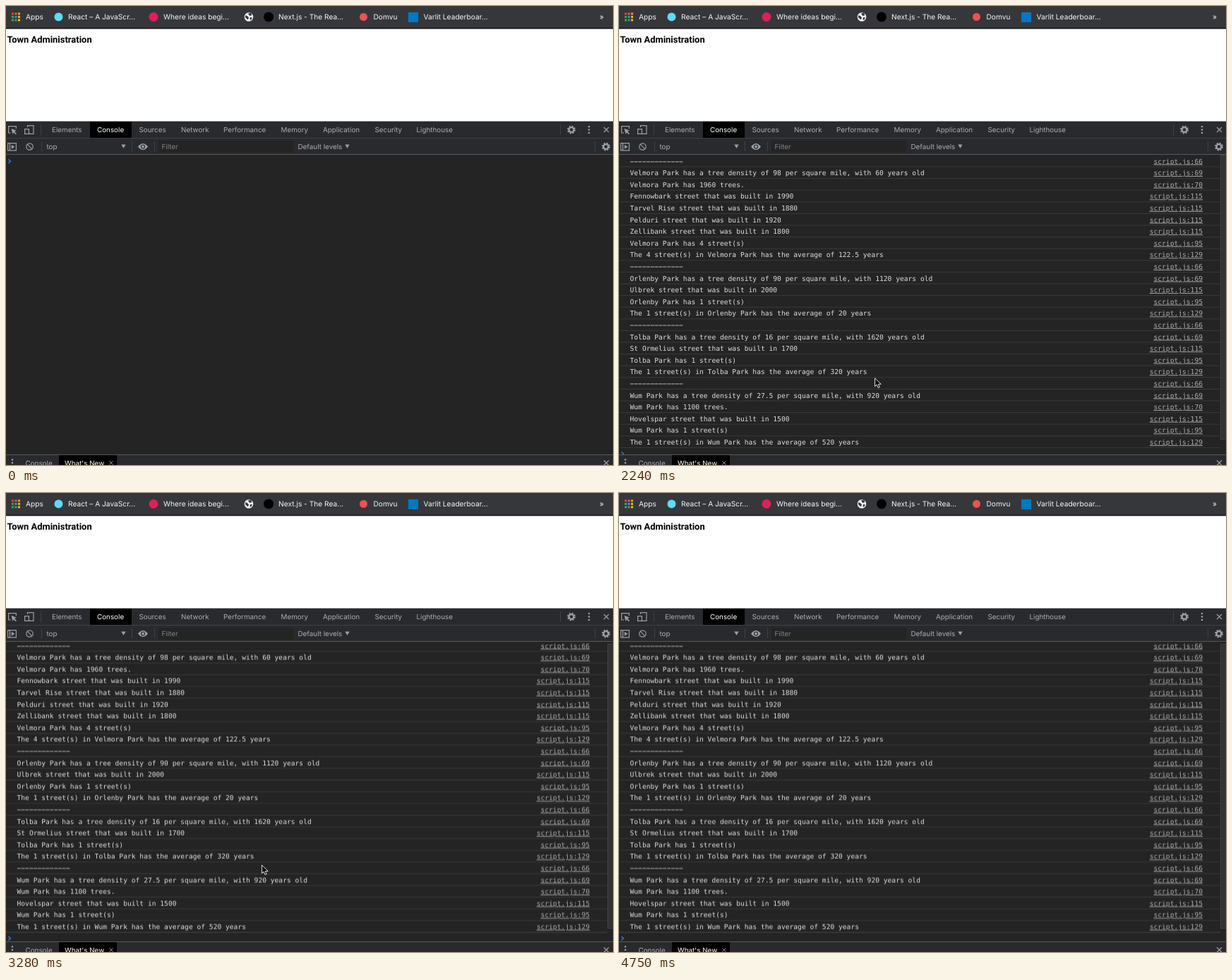
Animation of 860 by 651 pixels, one loop 6520 ms. Source, as an HTML page:

```html
<!DOCTYPE html>
<html lang="en">
<head>
<meta charset="utf-8">
<title>Town Administration</title>
<style>
  html, body { margin: 0; width: 100%; height: 100%; overflow: hidden; background: #fff; }
  svg { display: block; }
  text { font: 9.85px Inter, sans-serif; fill: #a9aeb4; text-rendering: geometricPrecision; white-space: pre; }
  .bm { font-size: 10.2px; fill: #f4f5f6; }
  .on { fill: #fff; }
  .dim { fill: #80858a; }
  .mono { font: 9.64px "DejaVu Sans Mono", monospace; fill: #dedede; }
  .link { fill: #acacac; text-decoration: underline; }
  .title { font: 700 12.95px Roboto, sans-serif; fill: #000; }
  .icon { fill: none; stroke: #9aa0a6; stroke-width: 1.2; }
  .solid { fill: #9aa0a6; }
  .sep { stroke: #3f4145; }
</style>
</head>
<body>
<svg id="stage" width="860" height="651" viewBox="0 0 860 651">
  <defs>
    <clipPath id="view"><rect y="211" width="860" height="425"/></clipPath>
    <g id="gear" class="icon">
      <circle r="3.4" stroke-width="2.3"/>
      <circle r="5" stroke-width="1.8" stroke-dasharray="2.2 1.727"/>
    </g>
    <path id="cross" class="icon" d="M-3.5-3.5 3.5 3.5M3.5-3.5-3.5 3.5" stroke-width="1.4"/>
    <g id="kebab" class="solid"><circle cy="-4.5" r="1.3"/><circle r="1.3"/><circle cy="4.5" r="1.3"/></g>
    <path id="caret" class="solid" d="M-3.2-2.6H3.2L0 2.8z"/>
  </defs>

  <!-- bookmarks and page -->
  <rect width="860" height="31" fill="#36373b"/>
  <rect y="31" width="860" height="1.5" fill="#0c0c0d"/>
  <g id="apps"></g>
  <circle cx="74.5" cy="15.5" r="6" fill="#61dafb"/>
  <circle cx="209" cy="15.5" r="6.5" fill="#e01e5a"/>
  <circle cx="344" cy="15.5" r="6.3" fill="#f1f3f4"/>
  <path d="M339.5 13l3.5 2 1 2-1.5 2.5-2-2-1.7-1.5zM343 10.5l4-.5 1.5 3-3 1-1.5-1.5zM346 16l3 .5-2 3.5-1.5-1z" fill="#36373b"/>
  <circle cx="372" cy="15.5" r="7" fill="#000"/>
  <circle cx="506.5" cy="15.5" r="5.5" fill="#ec5252"/>
  <rect x="570" y="9" width="14" height="14" fill="#0079bf"/>

  <!-- console -->
  <rect y="211" width="860" height="425" fill="#242424"/>
  <g clip-path="url(#view)">
    <g id="log"></g>
    <path id="prompt" d="M3.3-2.8 6.5 0 3.3 2.8" fill="none" stroke="#367cf1" stroke-width="1.4"/>
    <rect id="thumb" x="852.5" y="211.5" width="8" height="403" fill="#333" stroke="#414141"/>
  </g>

  <!-- panel tabs -->
  <rect y="163.5" width="860" height="47.5" fill="#292a2d"/>
  <rect y="187" width="860" height="1" fill="#3f4145"/>
  <rect y="210" width="860" height="1" fill="#56585c"/>
  <rect x="119" y="164" width="59" height="23" fill="#000"/>
  <path class="sep" d="M49.5 168v15M785.5 168v15M50.5 192v14M178.5 192v14M210.5 192v14M834.5 192v14"/>
  <path class="icon" d="M7 180H3.6V170.6H14.4V174"/>
  <path class="solid" d="M7.5 173.8l7.5 3-3 1.2 3 3-1.2 1.2-3-3-1.3 2.8z"/>
  <path class="icon" d="M30.5 172V169.6H39V181.4H33M26.6 174.6H32.4V181.4H26.6z"/>
  <use href="#gear" x="801" y="175.5"/>
  <use href="#kebab" x="826" y="175.5"/>
  <use href="#cross" x="850.5" y="175.5"/>

  <!-- console toolbar -->
  <path class="icon" d="M2.6 194.6H14.4V204.9H2.6zM5.5 194.6V205"/>
  <path class="solid" d="M7.8 196.8L12.3 199.7 7.8 202.7z"/>
  <circle class="icon" cx="33.5" cy="199.5" r="4.7"/>
  <path class="icon" d="M30.2 196.2l6.6 6.6"/>
  <use href="#caret" x="166.5" y="199"/>
  <path class="solid" d="M187 199.5q7-9 14 0-7 9-14 0z"/>
  <circle cx="194" cy="199.5" r="2.5" fill="none" stroke="#292a2d" stroke-width="1.2"/>
  <rect x="216" y="191" width="191" height="17" fill="#242424"/>
  <use href="#caret" x="483.5" y="199"/>
  <use href="#gear" x="850" y="199.5"/>

  <!-- drawer -->
  <rect y="636" width="860" height="15" fill="#292a2d"/>
  <rect y="636" width="860" height="1" fill="#56585c"/>
  <rect x="75" y="637" width="82" height="14" fill="#000"/>
  <use href="#kebab" x="9" y="648"/>
  <use href="#cross" transform="translate(149 648) scale(.75)"/>
  <use href="#cross" x="850.5" y="648"/>

  <g id="labels"></g>
  <path id="cursor" d="M.6 .9V12.4L3.2 10 5.2 14.5 7.2 13.6 5.3 9.3H9.2z" fill="#000" stroke="#fff" stroke-width=".9"/>
</svg>

<script>
const $ = id => document.getElementById(id);
const NS = "http://www.w3.org/2000/svg";

function add(parent, tag, attrs, content = "") {
  const el = document.createElementNS(NS, tag);
  for (const key in attrs) el.setAttribute(key, attrs[key]);
  el.textContent = content;
  parent.append(el);
  return el;
}
const label = (x, y, str, cls = "") => add($("labels"), "text", { x, y, class: cls }, str);

// Static labels
const bookmarks = {
  28: "Apps", 88: "React – A JavaScr...", 223: "Where ideas begi...",
  386: "Next.js - The Rea...", 520.5: "Domvu", 591.5: "Varlit Leaderboar...", 841: "»"
};
for (const x in bookmarks) label(x, 19.3, bookmarks[x], "bm");

const tabs = {
  65: "Elements", 129: "Console", 188.5: "Sources", 248: "Network", 308: "Performance",
  389.5: "Memory", 449: "Application", 522.5: "Security", 581.5: "Lighthouse"
};
for (const x in tabs) label(x, 179.1, tabs[x], tabs[x] === "Console" ? "on" : "");

label(1.5, 52.3, "Town Administration", "title");
label(57.5, 202.8, "top");
label(220.5, 203.4, "Filter", "dim");
label(413.5, 202.8, "Default levels");
label(27.5, 652, "Console");
label(83, 652, "What's New", "on");

["#ea4335", "#ee5a32", "#f29a2e", "#34a853", "#4285f4", "#f4b400", "#34a853", "#3fa45b", "#fbbc05"]
  .forEach((fill, i) => add($("apps"), "rect", {
    x: 8 + i % 3 * 4.5, y: 9.5 + Math.floor(i / 3) * 4.5, width: 3, height: 3, fill
  }));

// Console log
const TOP = 211.5, ROW = 16.6;
const parks = [
  { name: "Velmora", density: 98, age: 60, trees: 1960,
    streets: { "Fennowbark": 1990, "Tarvel Rise": 1880, "Pelduri": 1920, "Zellibank": 1800 } },
  { name: "Orlenby", density: 90, age: 1120, streets: { "Ulbrek": 2000 } },
  { name: "Tolba", density: 16, age: 1620, streets: { "St Ormelius": 1700 } },
  { name: "Wum", density: 27.5, age: 920, trees: 1100, streets: { "Hovelspar": 1500 } }
];

let count = 0;
function log(str, line) {
  const y = TOP + count++ * ROW, rows = $("log");
  add(rows, "text", { x: 15.5, y: y + 12, class: "mono" }, str);
  add(rows, "text", { x: 827, y: y + 12, class: "mono link", "text-anchor": "end" }, "script.js:" + line);
  add(rows, "rect", { y: y + ROW - 0.6, width: 852, height: 1, fill: "#3a3a3a" });
}

for (const { name, density, age, trees, streets } of parks) {
  const park = name + " Park", list = Object.entries(streets), n = list.length;
  const mean = list.reduce((sum, [, year]) => sum + 2020 - year, 0) / n;
  log("\u2212".repeat(13), 66);
  log(`${park} has a tree density of ${density} per square mile, with ${age} years old`, 69);
  if (trees) log(`${park} has ${trees} trees.`, 70);
  for (const [street, year] of list) log(`${street} street that was built in ${year}`, 115);
  log(`${park} has ${n} street(s)`, 95);
  log(`The ${n} street(s) in ${park} has the average of ${mean} years`, 129);
}

// Steps: time, scroll (null = empty console), pointer position
const LOOP = 6520, END = 21.9, NEAR = 3.5;
const rest = [362, 527];
const steps = [
  [0, null],
  [150, END],
  [1050, END, 768, 614],
  [1200, END],
  [1500, END, 541, 650],
  [1640, END, 376, 538],
  [1790, END, ...rest],
  [2090, NEAR, ...rest],
  [2240, 0, ...rest],
  [2680, 0.9, ...rest],
  [2830, END, ...rest],
  [3280, NEAR, ...rest],
  [3420, 0, ...rest],
  [4170, NEAR, 425, 525],
  [4310, NEAR, 440, 542],
  [4460, NEAR, 475, 570],
  [4600, NEAR, 583, 617],
  [4750, NEAR]
];

function play(id, pose) {
  const frames = steps.map(([time, ...state]) => ({
    ...pose(...state), offset: time / LOOP, easing: "steps(1, end)"
  }));
  frames.push({ ...frames[frames.length - 1], offset: 1 });
  $(id).animate(frames, { duration: LOOP, iterations: Infinity });
}
const move = (x, y) => `translate(${x}px, ${y}px)`;
const shown = on => on ? 1 : 0;

play("log", scroll => ({ opacity: shown(scroll !== null), transform: move(0, -(scroll || 0)) }));
play("prompt", scroll => ({
  transform: move(0, TOP + 8.7 + (scroll === null ? 0 : count * ROW - scroll))
}));
play("thumb", scroll => ({
  opacity: shown(scroll !== null), transform: move(0, Math.floor((scroll || 0) * 0.96))
}));
play("cursor", (scroll, x, y) => ({
  opacity: shown(x !== undefined), transform: move(x || 0, y || 0)
}));
</script>
</body>
</html>
```
